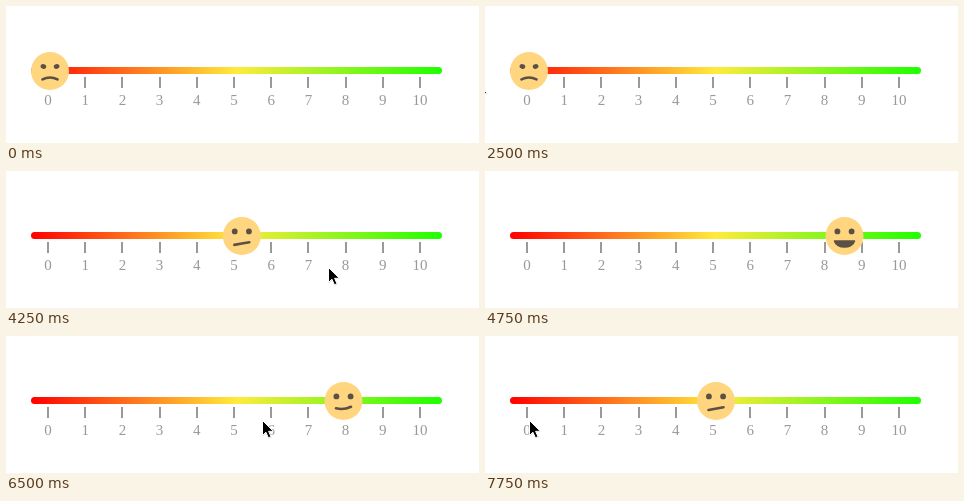
Recreate the animation shown at these times as an HTML page. Size 473 px wide and 137 px high, loop 8 s.

```html
<!DOCTYPE html>
<html lang="en">
<head>
<meta charset="utf-8">
<title>Mood slider</title>
<style>
html, body { margin: 0; width: 100%; height: 100%; overflow: hidden; background: #fff; }
svg { display: block; width: 473px; height: 137px; }
text { font: 15px "Liberation Serif", "Times New Roman", serif; fill: #999; text-anchor: middle; }
</style>
</head>
<body>
<svg viewBox="0 0 473 137">
  <defs>
    <linearGradient id="mood">
      <stop offset="0" stop-color="#f00"/>
      <stop offset=".5" stop-color="#ffeb3b"/>
      <stop offset="1" stop-color="#1eff00"/>
    </linearGradient>
  </defs>
  <rect x="25" y="61" width="411" height="7" rx="3.5" fill="url(#mood)"/>
  <g id="scale"></g>
  <g id="face">
    <circle r="19" fill="#ffd57f"/>
    <ellipse id="left" fill="#5c5046"/>
    <ellipse id="right" fill="#5c5046"/>
    <path id="mouth" stroke="#5c5046" stroke-linecap="round" stroke-linejoin="round"/>
  </g>
  <g id="cursor">
    <path d="M1 1.5V16l3.5-3.2 2.5 5.6 2.6-1.1-2.4-5.4h4.6z" fill="#000" opacity=".2"/>
    <path d="M.5 .5V15.5l3.4-3.3 2.5 5.6 2.6-1.1-2.4-5.4h4.8z" fill="#000" stroke="#fff"/>
  </g>
</svg>
<script>
const $ = id => document.getElementById(id);
const NS = "http://www.w3.org/2000/svg";
const LOOP = 8000, STEP = 250, UNIT = 37.2, START = 44, END = START + 10 * UNIT;

// each visit of the pointer: time, x, y
const visits = [
  [[500, 312, 12], [1250, 34, 64], [2500, -9, 76], [2750, 116, 22],
   [3500, 153, 82], [4000, 246, 86], [4250, 322, 96]],
  [[5500, 442, 94], [6500, 256, 84], [7250, 406, 22], [7750, 44, 84]]
];

// time, x of the face
const slide = [
  [0, START], [3000, START], [3500, 85], [4000, 174], [4750, 359.5],
  [5000, END], [5500, END], [6500, 337.5], [7750, 231]
];

function set(el, attrs) {
  for (const key in attrs) el.setAttribute(key, attrs[key]);
}
function add(tag, attrs, label = "") {
  const el = document.createElementNS(NS, tag);
  set(el, attrs);
  el.textContent = label;
  $("scale").append(el);
}

// linear position along a path of [time, ...values]
function along(path, t) {
  const next = path.findIndex(p => p[0] >= t);
  const b = path[next], a = path[Math.max(0, next - 1)];
  const k = (t - a[0]) / (b[0] - a[0] || 1);
  return a.slice(1).map((n, i) => n + (b[i + 1] - n) * k);
}

for (let i = 0; i <= 10; i++) {
  const x = 42 + i * UNIT;
  add("rect", { x: Math.round(x) - 1, y: 71, width: 2, height: 11, fill: "#999" });
  add("text", { x, y: 99 }, i);
}

function drawFace(x) {
  const v = (x - START) / UNIT;
  const tilt = Math.max(0, 18 - v * 4);
  const gap = 6.6 + Math.min(v, 5) * .1;
  const slant = 1.3 * Math.sin(Math.PI * v / 10);
  const edge = 8.4 - .03 * v * v;
  const bend = 4.6 + .6 * v;

  for (const [id, side] of [["left", -1], ["right", 1]]) {
    const cx = side * gap, cy = -4.6;
    set($(id), { cx, cy, rx: 2.9, ry: 2.9 - tilt * .03, transform: `rotate(${-side * tilt} ${cx} ${cy})` });
  }
  set($("mouth"), v > 8.2
    ? { d: "M-10 5H10C8 13-8 13-10 5Z", fill: "#5c5046", "stroke-width": 1.5 }
    : { d: `M-7.5 ${edge + slant}Q0 ${bend} 7.5 ${edge - slant}`, fill: "none", "stroke-width": 2.6 });
  set($("face"), { transform: `translate(${x} 65)` });
}

function draw(time) {
  const t = Math.floor((time % LOOP) / STEP) * STEP;
  const visit = visits.find(path => t >= path[0][0] && t <= path.at(-1)[0]);
  drawFace(along(slide, t)[0]);
  set($("cursor"), {
    visibility: visit ? "visible" : "hidden",
    transform: visit ? `translate(${along(visit, t)})` : ""
  });
}

const begin = performance.now();
function tick() {
  draw(performance.now() - begin);
  requestAnimationFrame(tick);
}
tick();
</script>
</body>
</html>
```
